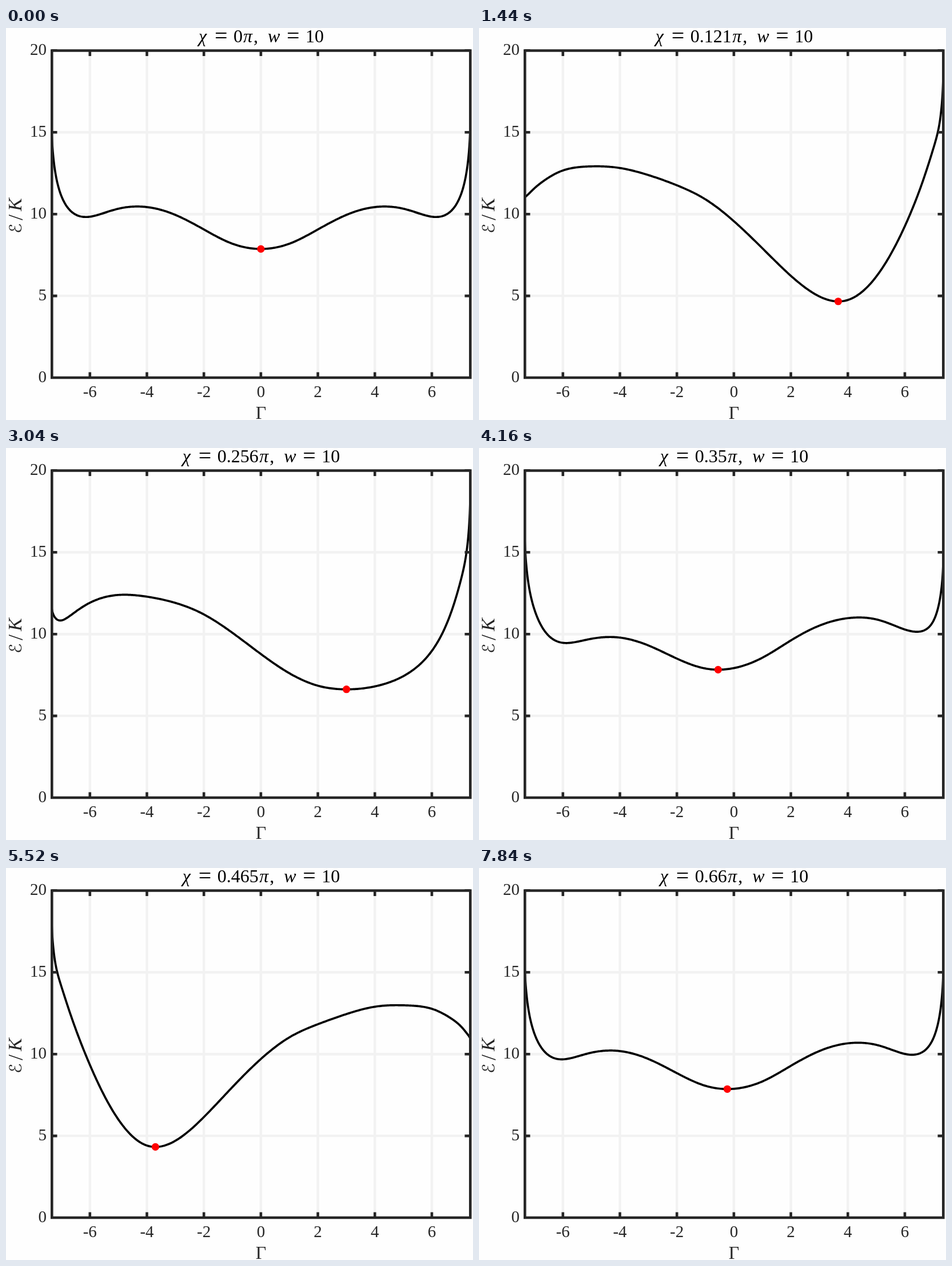
These frames come from a looping animation (817 px wide and 685 px high, 7.92 s). An HTML page:

```html
<!DOCTYPE html>
<html lang="en">
<head>
<meta charset="utf-8">
<title>Energy landscape</title>
<style>
  html, body { margin: 0; width: 100%; height: 100%; overflow: hidden; background: #fefefe; }
  svg { display: block; width: 817px; height: 685px; }
  text { font-family: "Liberation Serif", "Times New Roman", serif; fill: #000; font-size: 32px; }
  .tick { font-size: 29px; fill: #262626; }
  .label { fill: #262626; }
  .it { font-style: italic; }
  .eq { font-size: 40px; }
  .script { font-family: "DejaVu Sans", sans-serif; font-size: 29px; }
</style>
</head>
<body>
<svg id="stage" viewBox="0 0 817 685">
  <defs><clipPath id="area"><rect x="80" y="39" width="732.5" height="572"/></clipPath></defs>
</svg>
<script>
const STEP = 80, COUNT = 99;
const LIMIT = Math.sqrt(54);
const px = g => 445.9 + g * 49.85;
const py = e => 611 - e * 28.58;

const stage = document.getElementById('stage');
function add(tag, attrs, text, parent = stage) {
  const el = document.createElementNS('http://www.w3.org/2000/svg', tag);
  for (const key in attrs) el.setAttribute(key, attrs[key]);
  if (text !== undefined) el.textContent = text;
  parent.appendChild(el);
  return el;
}

// Energy = even + square*s^2 + (odd*s + cube*s^3), with s = sin(3 chi)
const knots = [0, 1, 2, 3, 4, 5, 6, 6.5, 7, 7.2, LIMIT];
const coef = {
  even:   [7.87, 8.19, 9.06, 9.95, 10.43, 10.33, 9.84, 9.97, 11.1, 12.4, 15.9],
  square: [2.05, 1.47, -0.08, -1.54, -1.99, -0.94, 1.36, 2.22, 2.05, 1.1, -1.1],
  odd:    [0, -2.1, -3.53, -3.83, -3.74, -3.75, -2.6, -0.8, 2.25, 3.6, 6.4],
  cube:   [0, 0.55, 0.59, -0.3, -0.84, 0.06, 0.88, 0.4, -1.1, -1.6, -2.4]
};

const angle = g => Math.asin(Math.max(-1, Math.min(1, g / LIMIT)));
const mirror = (list, sign) => [...list.slice(1).reverse().map(v => sign * v), ...list];

// Natural cubic spline through (x, y)
function spline(x, y) {
  const n = x.length, m = Array(n).fill(0), c = Array(n).fill(0);
  for (let i = 1; i < n - 1; i++) {
    const h0 = x[i] - x[i - 1], h1 = x[i + 1] - x[i];
    const rhs = 6 * ((y[i + 1] - y[i]) / h1 - (y[i] - y[i - 1]) / h0);
    const p = 2 * (h0 + h1) - h0 * c[i - 1];
    c[i] = h1 / p;
    m[i] = (rhs - h0 * m[i - 1]) / p;
  }
  for (let i = n - 2; i > 0; i--) m[i] -= c[i] * m[i + 1];
  return t => {
    let i = 0;
    while (i < n - 2 && t > x[i + 1]) i++;
    const h = x[i + 1] - x[i], a = (x[i + 1] - t) / h, b = 1 - a;
    return a * y[i] + b * y[i + 1] + ((a ** 3 - a) * m[i] + (b ** 3 - b) * m[i + 1]) * h * h / 6;
  };
}

const us = mirror(knots.map(angle), -1);
const even = spline(us, mirror(coef.even, 1));
const square = spline(us, mirror(coef.square, 1));
const odd = spline(us, mirror(coef.odd, -1));
const cube = spline(us, mirror(coef.cube, -1));

const samples = Array.from({ length: 501 }, (_, i) => {
  const u = (i / 250 - 1) * Math.PI / 2;
  return { g: LIMIT * Math.sin(u), k: [even(u), odd(u), square(u), cube(u)] };
});
const energy = ({ k }, s) => k[0] + s * (k[1] + s * (k[2] + s * k[3]));

// Grid, curve, frame and ticks
const xTicks = [-6, -4, -2, 0, 2, 4, 6], yTicks = [0, 5, 10, 15, 20];
let grid = '', marks = '';
for (const v of xTicks) {
  grid += `M${px(v)} 39V611`;
  marks += `M${px(v)} 611v-9.5M${px(v)} 39.5v9.5`;
  add('text', { class: 'tick', x: px(v), y: 645, 'text-anchor': 'middle' }, v);
}
for (const v of yTicks) {
  grid += `M80 ${py(v)}H812`;
  marks += `M80 ${py(v)}h9.5M812 ${py(v)}h-9.5`;
  add('text', { class: 'tick', x: 71, y: py(v) + 8, 'text-anchor': 'end' }, v);
}
add('path', { d: grid, stroke: '#f2f2f2', 'stroke-width': 4.4, fill: 'none' });
const curve = add('path', {
  stroke: '#000', 'stroke-width': 3.7, fill: 'none',
  'stroke-linejoin': 'round', 'clip-path': 'url(#area)'
});
add('path', { d: marks + 'M80.3 39.5H812.3V611H80.3Z', stroke: '#262626', 'stroke-width': 4.6, fill: 'none' });
const dot = add('circle', { r: 6.6, fill: '#f00' });

// Axis labels
add('text', { class: 'label', x: 446, y: 683, 'text-anchor': 'middle' }, 'Γ');
const side = add('g', { transform: 'translate(27 359) rotate(-90)' });
add('text', { class: 'label script', x: 0, y: 0 }, 'ℰ', side);
add('text', { class: 'label', x: 23, y: 2, style: 'font-size:36px' }, '/', side);
add('text', { class: 'label it', x: 39, y: 0, style: 'font-size:34px' }, 'K', side);

// Title: fixed parts on both sides of the running number
const title = add('g', {});
const word = (text, x, cls, parent) => add('text', { x, y: cls === 'eq' ? 27 : 25, class: cls }, text, parent);
word('χ', 2, 'it', title);
word('=', 30, 'eq', title);
const number = word('0', 63, '', title);
const tail = add('g', {}, undefined, title);
word('π', 1, 'it', tail);
word(',', 19, '', tail);
word('w', 44, 'it', tail);
word('=', 77, 'eq', tail);
word('10', 110, '', tail);

function draw(step) {
  const turn = step / COUNT * 2 / 3;
  const s = Math.sin(3 * Math.PI * turn);
  let low = null, d = '';
  for (const p of samples) {
    const e = energy(p, s);
    if (!low || e < low.e) low = { g: p.g, e };
    d += `${d ? 'L' : 'M'}${px(p.g).toFixed(2)} ${py(e).toFixed(2)}`;
  }
  curve.setAttribute('d', d);
  dot.setAttribute('cx', px(low.g));
  dot.setAttribute('cy', py(low.e));

  const label = String(Number(turn.toPrecision(3)));
  const width = label.length > 1 ? 16 * (label.length - 1) + 8.5 : 16;
  number.textContent = label;
  tail.setAttribute('transform', `translate(${63 + width} 0)`);
  title.setAttribute('transform', `translate(${445.5 - (205 + width) / 2} 0)`);
}

let shown = -1;
function tick() {
  const step = Math.floor(performance.now() / STEP) % COUNT;
  if (step !== shown) draw(shown = step);
  requestAnimationFrame(tick);
}
tick();
</script>
</body>
</html>
```
